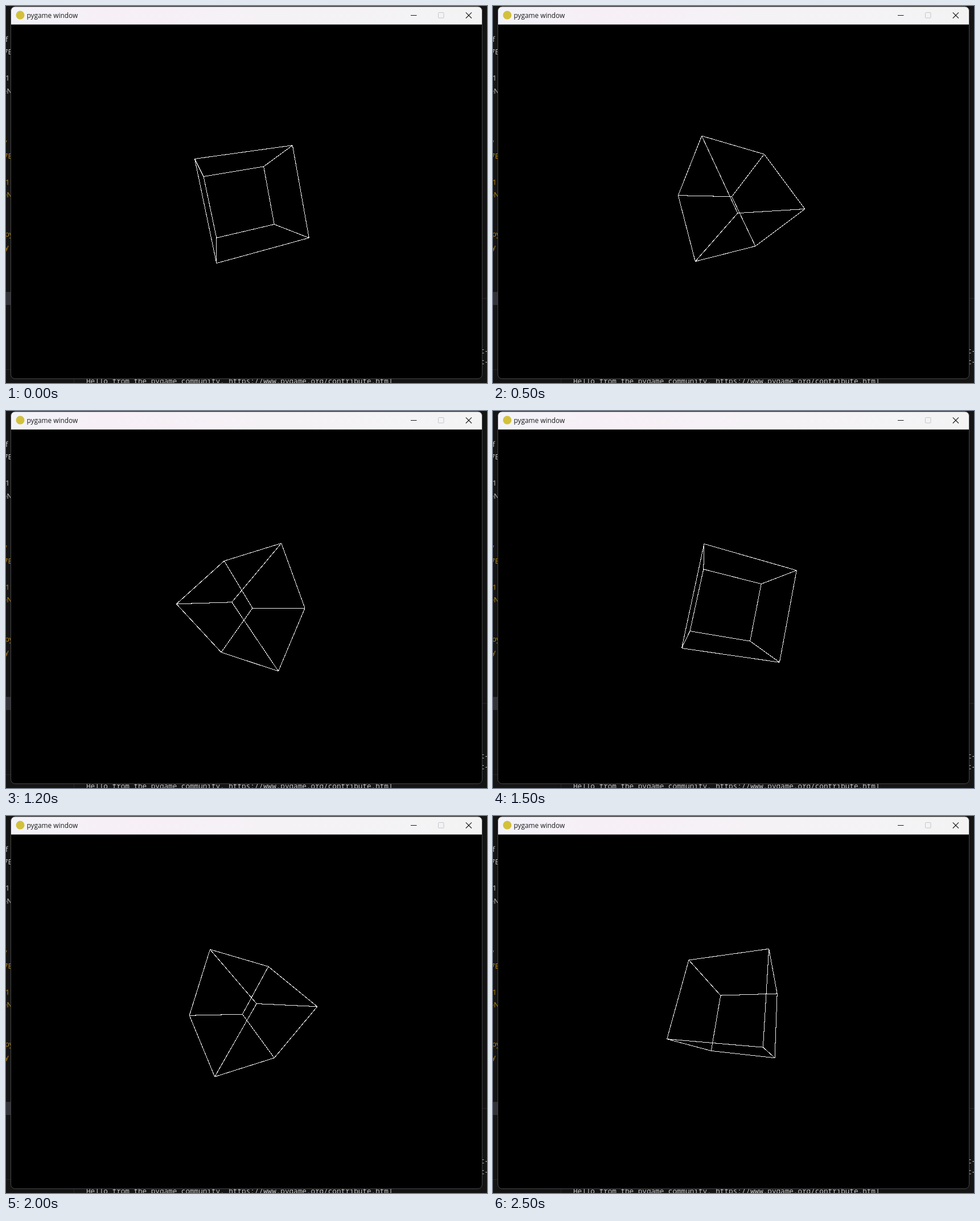
An HTML page for the animation above (2.6 s loop, 845 by 662 pixels).

```html
<!DOCTYPE html>
<html lang="en">
<head>
<meta charset="utf-8">
<title>pygame window</title>
<style>
  html, body { margin: 0; width: 100%; height: 100%; overflow: hidden; background: #141415; }
  svg { display: block; position: absolute; left: 0; top: 0; }
  .ui { font: 13px "Open Sans", "Noto Sans", sans-serif; }
  .mono { font: 12.65px "Noto Sans Mono", "DejaVu Sans Mono", monospace; fill: #c8c8c8; }
  .title { font: 11.85px "Open Sans", "Noto Sans", sans-serif; fill: #1a1a1a; }
</style>
</head>
<body>
<svg width="845" height="662" viewBox="0 0 845 662">
  <defs>
    <linearGradient id="bar">
      <stop offset="0" stop-color="#f2f3f9"/>
      <stop offset=".2" stop-color="#f7eff6"/>
      <stop offset=".55" stop-color="#f5f2f6"/>
      <stop offset="1" stop-color="#f3f3f4"/>
    </linearGradient>
    <clipPath id="frame"><rect x="8.5" y="1" width="828" height="653.5" rx="7.5"/></clipPath>
  </defs>

  <!-- editor behind the window -->
  <rect width="845" height="662" fill="#141415"/>
  <rect y="502" width="9" height="23" fill="#33333a"/>
  <path d="M0 638.5H9M119.5 655V662M836 513.5H845" stroke="#252526"/>
  <g class="ui" fill="#c8c8c8">
    <text x="-1" y="63">f</text>
    <text x="-4" y="85">7E</text>
    <text x="-1" y="131">11</text>
    <text x="-6" y="154">eN</text>
  </g>
  <g class="ui" fill="#bd8a12">
    <text x="-3" y="245">/</text>
    <text x="-4" y="268">7E</text>
    <text x="-1" y="314">11</text>
    <text x="-6" y="336">eN</text>
    <text x="-2" y="405">py</text>
    <text x="-2" y="428">y</text>
  </g>
  <g class="mono">
    <text x="833" y="610">t-</text>
    <text x="833" y="629">t-</text>
    <text x="141" y="662.5">Hello from the pygame community. https://www.pygame.org/contribute.html</text>
  </g>

  <!-- window -->
  <g clip-path="url(#frame)">
    <rect x="8" y="1" width="829" height="654"/>
    <rect x="8" y="1" width="829" height="31.5" fill="url(#bar)"/>
  </g>
  <rect x="8.5" y="1" width="828" height="653.5" rx="7.5" fill="none" stroke="#454545"/>
  <circle cx="25" cy="16" r="7.5" fill="#d3c13c"/>
  <text class="title" x="36.5" y="20.5">pygame window</text>
  <g fill="none" stroke="#1a1a1a">
    <path d="M711 16.5H721.5"/>
    <path d="M807.8 11.3L818 21.5M818 11.3L807.8 21.5" stroke-width="1.1"/>
    <rect x="759.5" y="11.5" width="9.5" height="9.5" rx="1" stroke="#c6c4c8"/>
  </g>
  <path id="cube" fill="none" stroke="#ededed" stroke-width="1.035" shape-rendering="crispEdges"/>
</svg>

<script>
const LOOP = 2600, STEP = 100;
const SCALE = 1.035, FOV = 256, DIST = 4;
const CX = 422.6, CY = 343;
// [time in ms, turn in degrees], used for both the x and the y axis
const TURN = [[0, -101.3], [500, -37.7], [800, -1.7], [1200, 42.6],
              [1700, 102], [2200, 164.7], [2500, 200.9]];

const corners = [...Array(8).keys()].map(i => [1, 2, 4].map(bit => i & bit ? 1 : -1));
const edges = [];
for (let i = 0; i < 8; i++)
  for (const bit of [1, 2, 4]) if (!(i & bit)) edges.push([i, i | bit]);

function turnAt(t) {
  let k = 0;
  while (k < TURN.length - 2 && t >= TURN[k + 1][0]) k++;
  const [t0, a0] = TURN[k], [t1, a1] = TURN[k + 1];
  return (a0 + (a1 - a0) * (t - t0) / (t1 - t0)) * Math.PI / 180;
}

function project([x, y, z], angle) {
  const c = Math.cos(angle), s = Math.sin(angle);
  const y1 = y * c - z * s, z1 = y * s + z * c;
  const x2 = x * c + z1 * s, z2 = z1 * c - x * s;
  const f = FOV / (DIST + z2);
  const place = (mid, v) => (mid + Math.round(v * f) * SCALE).toFixed(2);
  return place(CX, x2) + " " + place(CY, y1);
}

const cube = document.getElementById("cube");
let start;

function draw(now) {
  start ??= now;
  const t = Math.floor((now - start) % LOOP / STEP) * STEP;
  const angle = turnAt(t);
  const pts = corners.map(p => project(p, angle));
  cube.setAttribute("d", edges.map(([a, b]) => `M${pts[a]}L${pts[b]}`).join(""));
  requestAnimationFrame(draw);
}
draw(performance.now());
</script>
</body>
</html>
```
